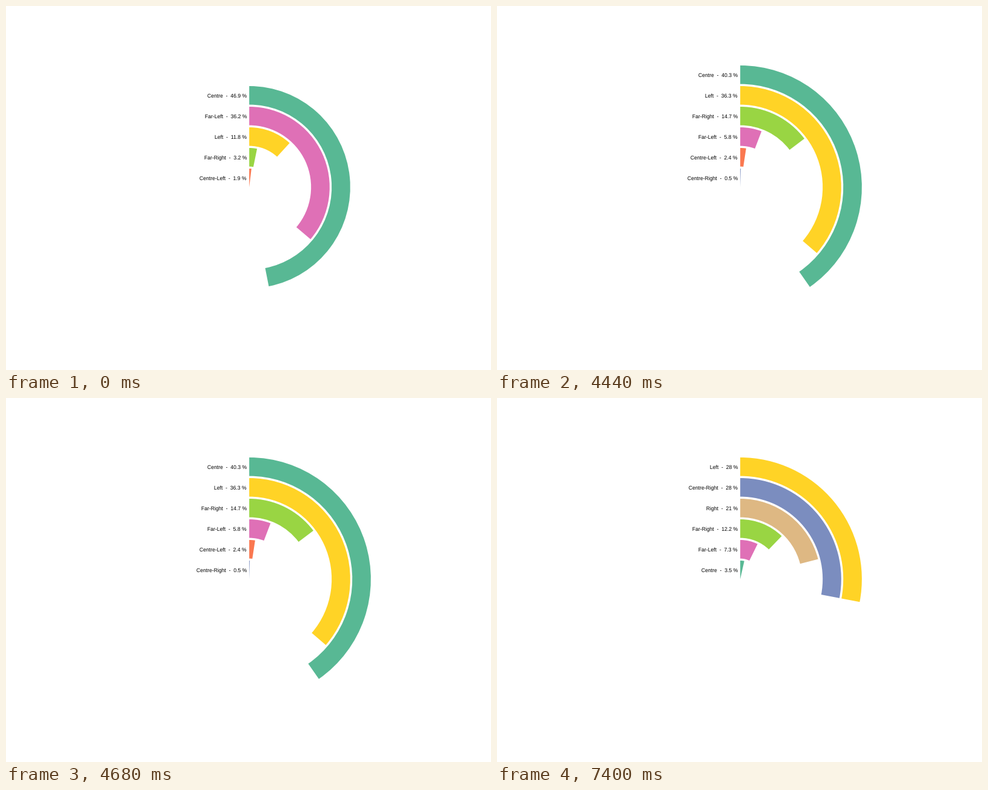
A matplotlib script that plays this animation: 800x600 px, repeating every 8 s.

```python
import matplotlib.pyplot as plt
from matplotlib.animation import FuncAnimation
from matplotlib.patches import Wedge

plt.rcParams["text.hinting"] = "none"
plt.rcParams["font.family"] = "Liberation Sans"

W, H, DPI = 800, 600, 100
STEP_MS, FRAMES = 40, 200
HOLD = 37                      # frames per chart
CX, CY = 401.2, 301.4
PITCH, THICK = 34, 30.6        # ring spacing and bar thickness
FONT_PX = 8.6

COLORS = {
    "Centre": "#58b894",
    "Far-Left": "#df70b6",
    "Left": "#ffd326",
    "Far-Right": "#99d543",
    "Centre-Left": "#fa7850",
    "Centre-Right": "#7b8dbf",
    "Right": "#deb883",
}

# Shares in percent, outermost ring first
CHARTS = [
    {"Centre": 46.9, "Far-Left": 36.2, "Left": 11.8, "Far-Right": 3.2,
     "Centre-Left": 1.9},
    {"Centre": 44.9, "Far-Left": 37.2, "Left": 14.2, "Far-Right": 3.5,
     "Centre-Left": 0.2},
    {"Centre": 44.3, "Far-Left": 31.2, "Left": 16.7, "Far-Right": 6.8,
     "Centre-Left": 1},
    {"Centre": 40.3, "Left": 36.3, "Far-Right": 14.7, "Far-Left": 5.8,
     "Centre-Left": 2.4, "Centre-Right": 0.5},
    {"Centre-Right": 28.1, "Left": 26.7, "Centre": 16.5, "Right": 13.6,
     "Far-Right": 10.1, "Far-Left": 3.8, "Centre-Left": 1.1},
    {"Left": 28, "Centre-Right": 28, "Right": 21, "Far-Right": 12.2,
     "Far-Left": 7.3, "Centre": 3.5},
]

fig = plt.figure(figsize=(W / DPI, H / DPI), dpi=DPI, facecolor="white")
ax = fig.add_axes([0, 0, 1, 1])
ax.set_xlim(0, W)
ax.set_ylim(0, H)
ax.axis("off")


def build_chart(shares):
    """Add the rings and labels of one chart and return them, hidden."""
    parts = []
    for i, (name, share) in enumerate(shares.items()):
        ring = len(shares) - 1 - i
        wedge = Wedge((CX, CY), ring * PITCH + THICK, 90 - 3.6 * share, 90,
                      width=THICK, facecolor=COLORS[name], linewidth=0)
        parts.append(ax.add_patch(wedge))
        parts.append(ax.text(397, 313 + ring * PITCH,
                             f"{name}  -  {share:g} %",
                             ha="right", va="baseline", color="black",
                             fontsize=FONT_PX * 72 / DPI))
    for part in parts:
        part.set_visible(False)
    return parts


charts = [build_chart(shares) for shares in CHARTS]


def draw(frame):
    current = frame // HOLD
    for i, parts in enumerate(charts):
        for part in parts:
            part.set_visible(i == current)
    return []


anim = FuncAnimation(fig, draw, frames=FRAMES, interval=STEP_MS,
                     init_func=lambda: draw(0), repeat=True, repeat_delay=0)
plt.show()
```
